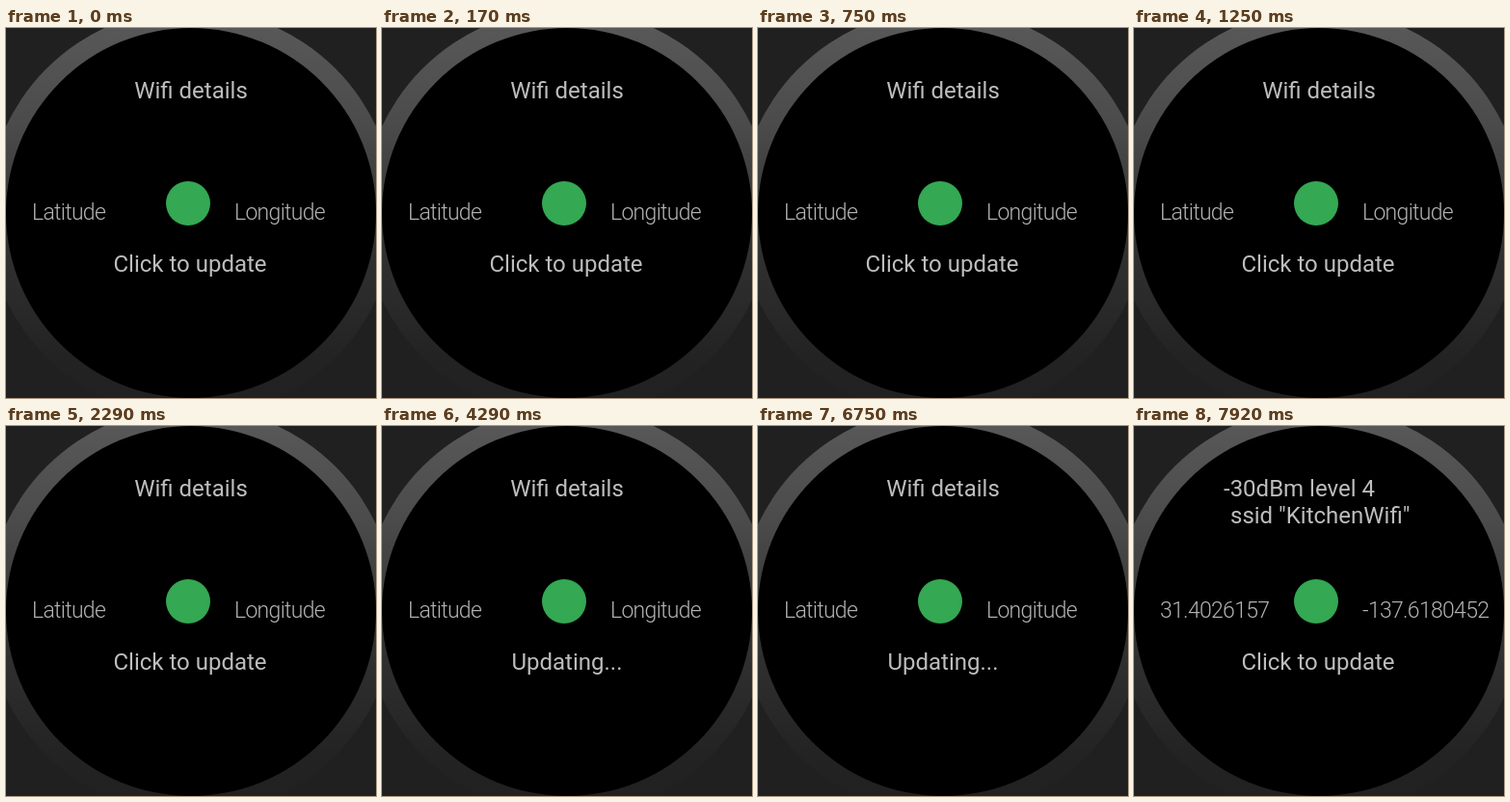
An HTML page that plays this animation: 384 by 384 pixels, repeating every 8000 ms.

```html
<!DOCTYPE html>
<html lang="en">
<head>
<meta charset="utf-8">
<title>Watch location screen</title>
<style>
  html, body { margin: 0; width: 100%; height: 100%; overflow: hidden; background: #202021; }
  svg { display: block; width: 100%; height: 100%; }
  text { font: 400 24px Roboto, sans-serif; fill: #bdbdbe; white-space: pre; }
  .mid { text-anchor: middle; }
  .side { font-size: 23px; font-weight: 300; letter-spacing: -.7px; fill: #b2b2b3; }
</style>
</head>
<body>
<svg viewBox="0 0 384 384">
  <defs>
    <linearGradient id="rim" x1="0" y1="0" x2="0" y2="1">
      <stop offset="0" stop-color="#5a5a5b"/>
      <stop offset=".28" stop-color="#4b4b4c"/>
      <stop offset=".55" stop-color="#333334"/>
      <stop offset=".85" stop-color="#232324"/>
      <stop offset="1" stop-color="#202021"/>
    </linearGradient>
  </defs>
  <rect width="384" height="384" fill="#202021"/>
  <circle cx="192" cy="192" r="212" fill="url(#rim)"/>
  <circle cx="192" cy="192" r="192" fill="#000"/>
  <circle cx="189" cy="182" r="23" fill="#34a853"/>

  <g class="before">
    <text class="mid" x="192" y="73">Wifi details</text>
    <text class="side" x="27" y="199">Latitude</text>
    <text class="side" x="237" y="199">Longitude</text>
  </g>
  <g class="after">
    <text x="93" y="73">-30dBm level 4</text>
    <text x="100" y="101">ssid "KitchenWifi"</text>
    <text class="side" x="27" y="199">31.4026157</text>
    <text class="side" x="237" y="199">-137.6180452</text>
  </g>
  <text class="mid idle" x="191" y="253">Click to update</text>
  <text class="mid busy" x="192" y="253">Updating...</text>
</svg>
<script>
  const LOOP = 8000, TAP = 3250, RESULT = 7830;

  // Each entry lists [time, visible] switches for one part.
  const switches = {
    before: [[0, 1], [RESULT, 0]],
    after: [[0, 0], [RESULT, 1]],
    idle: [[0, 1], [TAP, 0], [RESULT, 1]],
    busy: [[0, 0], [TAP, 1], [RESULT, 0]]
  };

  for (const [name, steps] of Object.entries(switches)) {
    const frames = steps.map(([time, opacity]) => (
      { opacity, offset: time / LOOP, easing: 'step-end' }
    ));
    frames.push({ opacity: steps.at(-1)[1], offset: 1 });
    document.querySelector('.' + name).animate(frames, { duration: LOOP, iterations: Infinity });
  }
</script>
</body>
</html>
```
